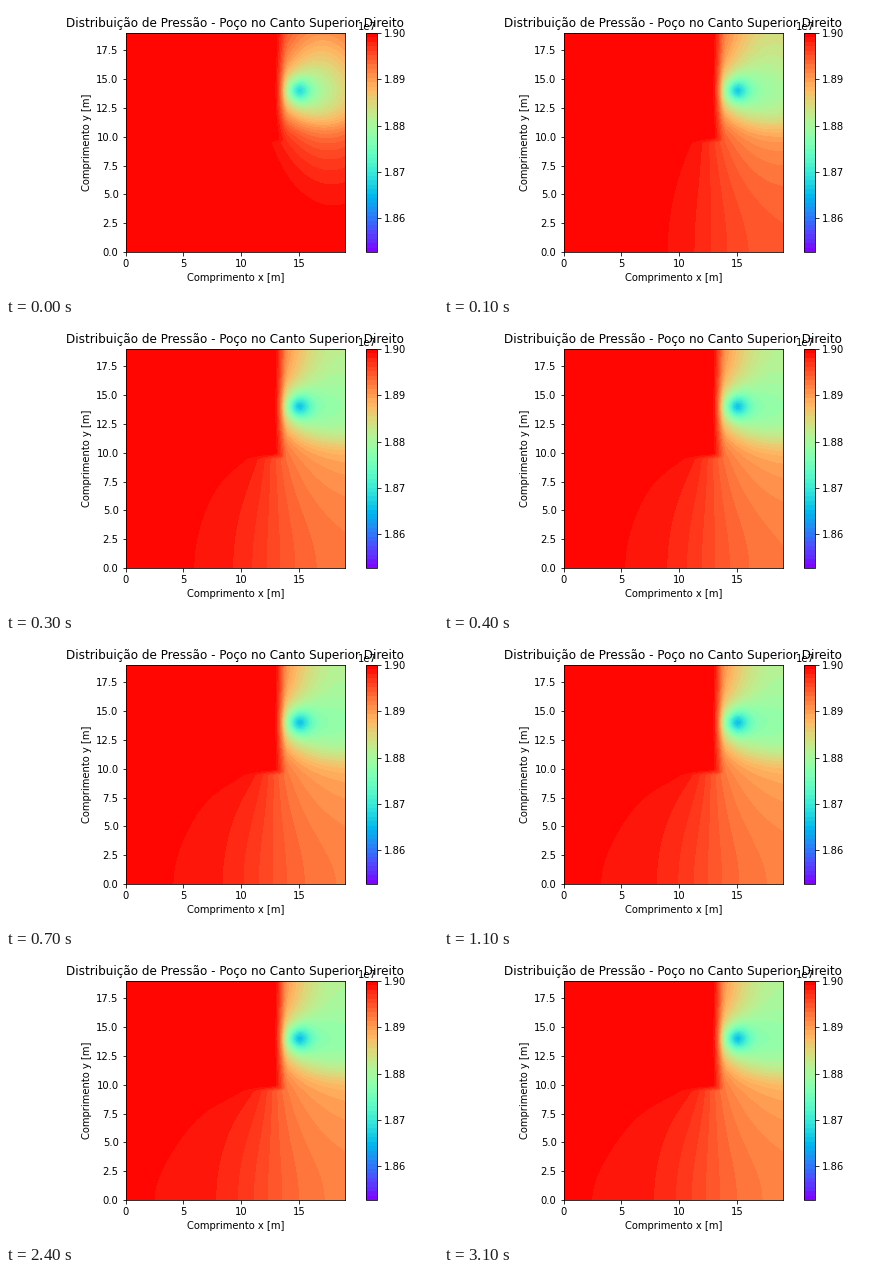
Animation, 432 px wide and 288 px high, one loop 7380 ms. Source, as a matplotlib script:

```python
import matplotlib.pyplot as plt
import numpy as np
from matplotlib.animation import FuncAnimation

W, H, DPI = 432, 288, 72
FRAME_MS, LOOP_MS, STEP_MS = 20, 7380, 100
LAST_STEP = 31

P_INIT = 1.9e7
LEVELS = np.linspace(1.8527e7, P_INIT, 50)
BAND = LEVELS[1] - LEVELS[0]
WELL_X, WELL_Y = 15, 14

AXIS = np.linspace(0, 19, 77)
X, Y = np.meshgrid(AXIS, AXIS)
WELL_DIST = np.hypot(X - WELL_X, Y - WELL_Y)


def sigmoid(z):
    return 1 / (1 + np.exp(-z))


UPPER = sigmoid((Y - 10.95) / 0.6)


def steady_drop():
    """Final pressure drop, counted in contour bands."""
    # Lower part: rises to the right, bends upwards around the inner corner
    along = 0.86 + 8 * sigmoid((X - 12.1) / 2.4)
    bend = 0.4 - 0.65 * sigmoid((X - 12.5) / 0.8)
    lower = along * (1 - bend * (Y / 8) ** 2)

    # Column of the well: wide background plus a rounded cone
    background = 19.5 + 2 * np.exp(-((Y - WELL_Y) / 2.5) ** 2)
    background = background * np.sin(np.pi * (X - 11.5) / 15)
    cone = 21.5 / (1 + (WELL_DIST / 1.2) ** 2) ** 1.2

    # The upper left block keeps its initial pressure
    open_part = np.maximum(np.clip(X - 12.85, 0, 1),
                           np.clip(2 * (10 - Y), 0, 1))
    drop = lower * (1 - UPPER) + background * UPPER + cone
    return open_part * np.maximum(drop - cone * (1 - UPPER), 0)


STEADY = steady_drop()

# Distance travelled from the well, longer where the flow turns the corner
REACH = WELL_DIST + 0.1 * (19 - X) ** 2 * (1 - UPPER)
FIRST_LAG = 1 - 0.92 * np.exp(-(REACH / 7.3) ** 2)
SLOW_SHARE = 0.12 + 0.33 * sigmoid((12 - X) / 1.5)


def pressure(step):
    """Pressure field after a number of time steps."""
    slow = SLOW_SHARE * np.exp(-0.22 * (step - 1))
    fast = 0.2 * np.exp(-1.4 * (step - 1))
    lag = FIRST_LAG * (1 if step == 0 else slow + fast)
    return P_INIT - BAND * STEADY * (1 - lag)


def pixel_axes(left, top, width, height):
    return fig.add_axes([left / W, 1 - (top + height) / H, width / W, height / H])


def fill(step):
    return ax.contourf(X, Y, pressure(step), levels=LEVELS, cmap="rainbow")


plt.rcParams.update({"font.family": "DejaVu Sans", "font.size": 10})
fig = plt.figure(figsize=(W / DPI, H / DPI), dpi=DPI, facecolor="white")
ax = pixel_axes(119.6, 27, 219.4, 219)
cax = pixel_axes(360, 27, 11, 219)

shown = {"step": 0, "fill": fill(0)}
bar = fig.colorbar(shown["fill"], cax=cax,
                   ticks=np.linspace(1.86e7, 1.9e7, 5))
bar.minorticks_off()

ax.set_title("Distribuição de Pressão - Poço no Canto Superior Direito",
             fontsize=12)
ax.set_xlabel("Comprimento x [m]")
ax.set_ylabel("Comprimento y [m]")
ax.set_xticks(np.arange(0, 20, 5))
ax.set_yticks(np.arange(0, 18, 2.5))
ax.set_xlim(0, 19)
ax.set_ylim(0, 19)


def update(frame):
    step = min(frame * FRAME_MS // STEP_MS, LAST_STEP)
    if step != shown["step"]:
        shown["fill"].remove()
        shown.update(step=step, fill=fill(step))
    return [shown["fill"]]


anim = FuncAnimation(fig, update, frames=LOOP_MS // FRAME_MS,
                     init_func=lambda: update(0), interval=FRAME_MS,
                     repeat=True, repeat_delay=0, blit=False)
plt.show()
```
